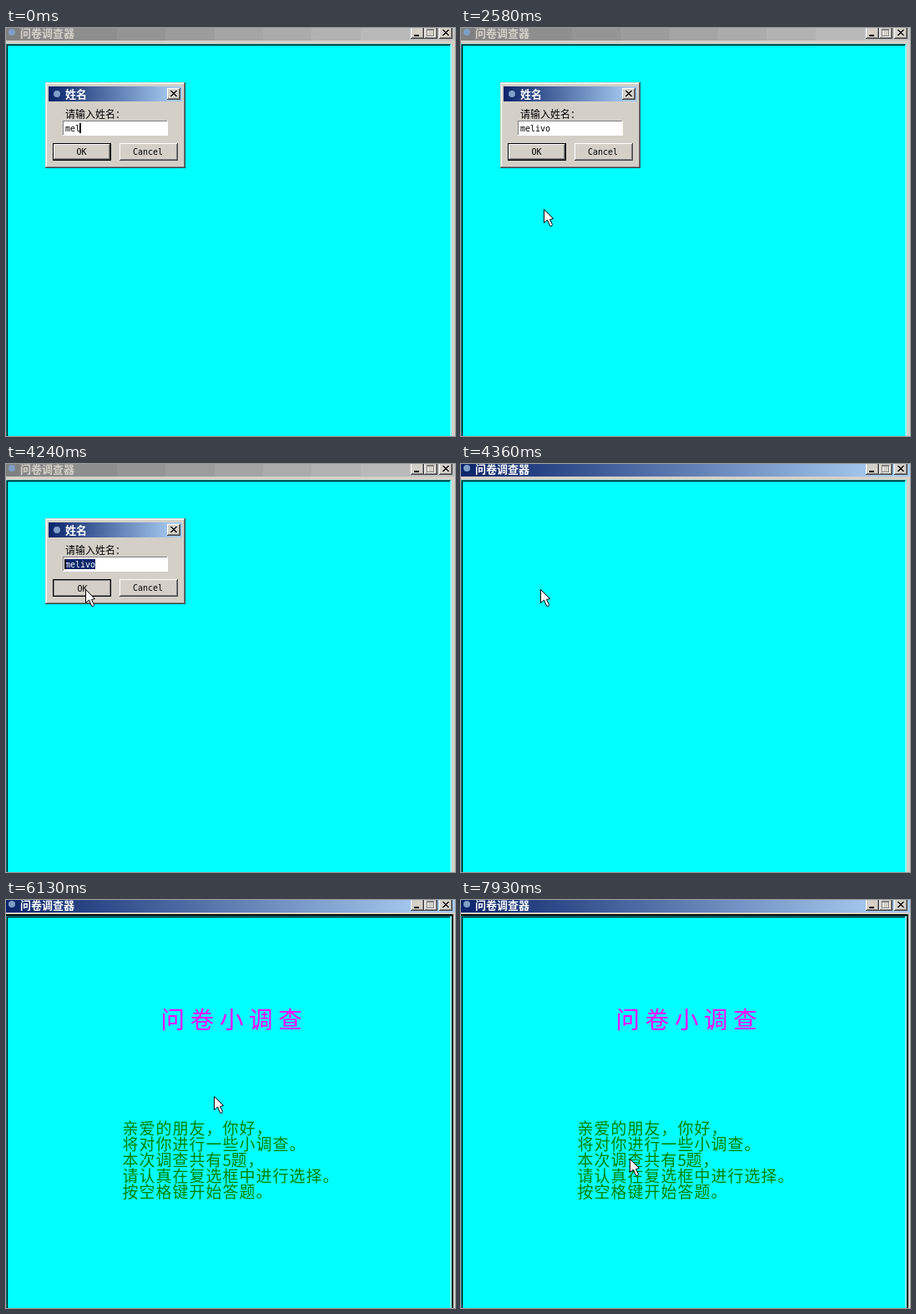
Animation of 538 by 489 pixels, one loop 7.99 s. Source, as an HTML page with a canvas:

```html
<!DOCTYPE html>
<html lang="zh-CN">
<head>
<meta charset="utf-8">
<title>问卷调查器</title>
<style>
  html, body { margin: 0; width: 100%; height: 100%; overflow: hidden; }
  canvas { display: block; }
</style>
</head>
<body>
<canvas id="stage" width="538" height="489"></canvas>
<script>
const ctx = document.getElementById('stage').getContext('2d');
const LOOP = 7990, STEP = 60;
const FACE = '#d4d0c8', SHADE = '#808080', DARK = '#404040', NAVY = '#0a246a', SKY = '#a6caf0';
const CYAN = '#0ff', CYAN_DARK = '#099', CYAN_LIGHT = '#7fffff';
const CJK = '"Noto Sans CJK SC", "Noto Sans CJK", sans-serif';
const MONO = '10px "DejaVu Sans Mono", monospace';
const NAME = 'melivo', CHAR = 6, ENTRY_X = 71;
const TYPED = 850, SELECT = 3170, SELECTED = 3344, PRESS = 4240, CLOSED = 4360, INTRO = 4420;

// Each glide runs from the last resting place to (x, y), bowed sideways by (bowX, bowY).
const glide = (from, to, x, y, bowX = 0, bowY = 0) => ({ from, to, x, y, bowX, bowY });
const entrance = { x: 55, y: 225 };
const glides = [
  glide(2340, 3110, 108, 120, 16, 47),
  glide(SELECT, SELECTED, 27, 120),
  glide(SELECTED, 3750, 95, 150, 19, 36),
  glide(4720, 5360, 188, 178, 75, 42),
  glide(5480, 5540, 190, 169),
  glide(5720, 5840, 291, 195),
  glide(6020, 6310, 179, 302),
  glide(6620, 7440, 159, 310, 103, -10),
  glide(7680, 7740, 202, 310)
];

const clamp = (v, lo, hi) => Math.max(lo, Math.min(hi, v));
const easeOut = f => 1 - (1 - f) ** 2;

function pointerAt(t) {
  let i = glides.length - 1;
  while (i >= 0 && glides[i].from > t) i--;
  if (i < 0) return null;
  const g = glides[i], last = glides[i - 1] || entrance;
  const elapsed = t >= g.to ? g.to - g.from : Math.floor((t - g.from) / STEP) * STEP;
  const f = easeOut(elapsed / (g.to - g.from));
  const bow = Math.sin(Math.PI * f);
  return {
    x: Math.round(last.x + (g.x - last.x) * f + g.bowX * bow),
    y: Math.round(last.y + (g.y - last.y) * f + g.bowY * bow)
  };
}

function rect(x, y, w, h, color) {
  ctx.fillStyle = color;
  ctx.fillRect(x, y, w, h);
}

function text(str, x, y, font, color) {
  ctx.font = font;
  ctx.fillStyle = color;
  ctx.fillText(str, x, y);
}

function spaced(str, x, y, pitch, font, color) {
  for (const ch of str) {
    text(ch, x, y, font, color);
    x += ch < '\u0080' ? pitch / 2 : pitch;
  }
}

// One-pixel bevel: first colour on top and left, second on bottom and right.
function bevel(x, y, w, h, topLeft, bottomRight) {
  rect(x, y, w, 1, topLeft);
  rect(x, y, 1, h, topLeft);
  rect(x, y + h - 1, w, 1, bottomRight);
  rect(x + w - 1, y, 1, h, bottomRight);
}

function button(x, y, w, h, pressed) {
  rect(x, y, w, h, FACE);
  if (pressed) {
    bevel(x, y, w, h, SHADE, SHADE);
  } else {
    bevel(x, y, w, h, '#fff', DARK);
    bevel(x + 1, y + 1, w - 2, h - 2, FACE, SHADE);
  }
}

function closeButton(x, y) {
  button(x, y, 16, 14);
  for (let i = 0; i < 7; i++) {
    rect(x + 4 + i, y + 3 + i, 2, 1, '#000');
    rect(x + 10 - i, y + 3 + i, 2, 1, '#000');
  }
}

function titleGradient(x, y, w, h, end) {
  const g = ctx.createLinearGradient(x, 0, end, 0);
  g.addColorStop(0, NAVY);
  g.addColorStop(1, SKY);
  rect(x, y, w, h, g);
}

function greyBands(w, h) {
  const band = 58.4;
  for (let i = 0; i < 10; i++) {
    const v = Math.round(128 + i * 7.1);
    const x = Math.max(0, Math.round(16 + (i - 1) * band));
    rect(x, 0, w - x, h, `rgb(${v},${v},${v})`);
  }
}

function icon(x, y) {
  ctx.fillStyle = '#7f9fc8';
  ctx.beginPath();
  ctx.arc(x, y, 4, 0, 2 * Math.PI);
  ctx.fill();
}

function mainWindow(active, focused) {
  rect(0, 0, 538, 489, FACE);
  if (active) titleGradient(0, 0, 538, 15, 500);
  else greyBands(538, 15);
  icon(7, 5);
  text('问卷调查器', 17, 11, 'bold 13px ' + CJK, active ? '#fff' : FACE);

  button(485, -1, 16, 14);
  rect(489, 8, 6, 2, '#000');
  button(501, -1, 16, 14);
  bevel(505, 2, 9, 9, '#fff', '#fff');
  bevel(504, 1, 9, 9, SHADE, SHADE);
  rect(504, 2, 9, 1, SHADE);
  closeButton(519, -1);

  if (focused) rect(0, 17, 536, 472, '#000');
  rect(0, 19, 534, 480, CYAN);
  bevel(0, 19, 534, 480, CYAN_DARK, CYAN_LIGHT);
  bevel(1, 20, 532, 478, '#000', CYAN_LIGHT);
}

function caretVisible(t) {
  const lastInput = t < SELECT ? TYPED : SELECT - 30;
  return Math.max(0, t - lastInput) % 920 < 610;
}

function entry(t) {
  rect(68, 111, 126, 18, '#fff');
  rect(68, 111, 125, 17, SHADE);
  rect(69, 112, 124, 16, '#fff');
  const count = clamp(3 + Math.floor((t - 220) / 210), 3, NAME.length);
  text(NAME.slice(0, count), ENTRY_X, 124, MONO, '#000');

  let caret = ENTRY_X + count * CHAR;
  if (t >= SELECT) {
    const first = t < SELECTED
      ? clamp(Math.round((pointerAt(t).x - ENTRY_X) / CHAR), 0, NAME.length) : 0;
    caret = ENTRY_X + first * CHAR;
    rect(caret - 1, 114, ENTRY_X + NAME.length * CHAR + 1 - caret, 12, NAVY);
    text(NAME.slice(first), caret, 124, MONO, '#fff');
  }
  if (caretVisible(t)) rect(caret - 1, 114, 2, 12, '#000');
}

function dialog(t) {
  rect(47, 65, 168, 103, FACE);
  bevel(47, 65, 168, 103, FACE, DARK);
  bevel(48, 66, 166, 101, '#fff', SHADE);
  titleGradient(51, 70, 160, 18, 200);
  icon(61, 79);
  text('姓名', 71, 84, 'bold 13px ' + CJK, '#fff');
  closeButton(193, 72);
  text('请输入姓名：', 71, 107.5, '12px ' + CJK, '#000');
  entry(t);

  const pressed = t >= PRESS;
  const shift = pressed ? 1 : 0;
  rect(56, 138, 70, 21, '#000');
  button(57, 139, 68, 19, pressed);
  button(136, 138, 70, 21);
  text('OK', 84.5 + shift, 152 + shift, MONO, '#000');
  text('Cancel', 152, 152, MONO, '#000');
}

function intro() {
  spaced('问卷小调查', 185.5, 153.5, 35.2, '28.5px ' + CJK, '#f0f');
  [
    '亲爱的朋友，你好，',
    '将对你进行一些小调查。',
    '本次调查共有5题，',
    '请认真在复选框中进行选择。',
    '按空格键开始答题。'
  ].forEach((line, i) => spaced(line, 139.5, 280.5 + i * 19, 20, '300 19px ' + CJK, '#008000'));
}

function arrow(x, y) {
  ctx.save();
  ctx.translate(x + .5, y + .5);
  ctx.fillStyle = '#fff';
  ctx.strokeStyle = '#000';
  ctx.lineWidth = 1;
  const outline = new Path2D('M0 0V16L4 12.5L7 19.5L9 20L10 18L7 12L11 11Z');
  ctx.fill(outline);
  ctx.stroke(outline);
  ctx.restore();
}

function beam(x, y) {
  rect(x, y - 7, 1, 15, '#000');
  for (const dy of [-8, 8]) {
    rect(x - 3, y + dy, 3, 1, '#000');
    rect(x + 1, y + dy, 3, 1, '#000');
  }
}

function draw(t) {
  mainWindow(t >= CLOSED, t >= INTRO);
  if (t < CLOSED) dialog(t);
  if (t >= INTRO) intro();
  const pointer = pointerAt(t);
  if (!pointer) return;
  const overEntry = t < CLOSED && pointer.y > 111 && pointer.y < 128;
  (overEntry ? beam : arrow)(pointer.x, pointer.y);
}

function tick() {
  draw(performance.now() % LOOP);
  requestAnimationFrame(tick);
}
tick();
</script>
</body>
</html>
```
